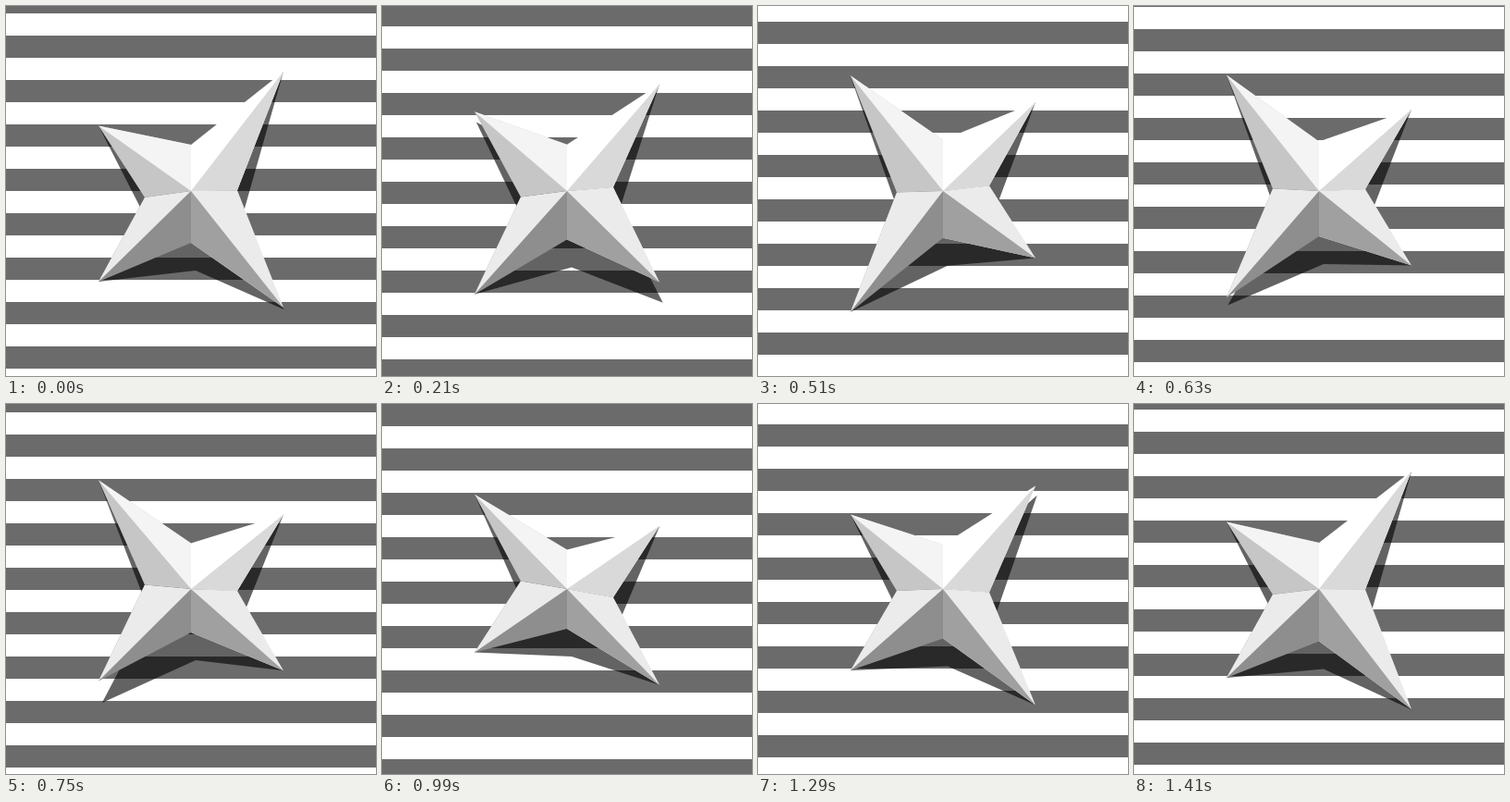
Write an HTML page that moves like this. It is 400 px wide and 400 px high and loops after 1.44 s.

```html
<!DOCTYPE html>
<html lang="en">
<head>
<meta charset="utf-8">
<title>Walking star</title>
<style>
html, body { margin: 0; width: 100%; height: 100%; overflow: hidden; background: #fff; }
svg { display: block; width: 100vw; height: 100vh; }
</style>
</head>
<body>
<svg id="stage" viewBox="0 0 400 400"></svg>
<script>
const LOOP = 1440, STEP = 30;
const TRAVEL = 96;   // ground distance per loop
const STRIDE = 64;   // reach of each foot
const SWING = 32;    // ground distance covered while a foot returns
const BODY = 30;     // body height above the ground

// Feet clockwise from top left: x, uppermost y, start of the return swing
const feet = [
  { x: 100, top: 69.5, lift: 4 },
  { x: 300, top: 70, lift: 63.2 },
  { x: 300, top: 268.3, lift: 92.8 },
  { x: 100, top: 267, lift: 33 }
];

// Facet colours before and after each ridge, clockwise
const shades = [
  ['#c6c6c6', '#f4f4f4'],
  ['#ffffff', '#d9d9d9'],
  ['#ebebeb', '#a0a0a0'],
  ['#8e8e8e', '#ebebeb']
];

const pace = [[0, 0], [990, 64.3], [1140, 76], [1410, 94], [LOOP, TRAVEL]];

const stage = document.getElementById('stage');

function add(name, attrs) {
  const el = document.createElementNS('http://www.w3.org/2000/svg', name);
  for (const key in attrs) el.setAttribute(key, attrs[key]);
  return stage.appendChild(el);
}

const stripes = Array.from({ length: 10 }, () =>
  add('rect', { width: 400, height: 24, fill: '#6b6b6b' }));
const shadow = add('polygon', { fill: '#000', 'fill-opacity': 0.61 });
const facets = shades.map(pair => pair.map(fill => add('polygon', { fill })));

const setPoints = (el, pts) =>
  el.setAttribute('points', pts.map(p => p.map(v => v.toFixed(2)).join()).join(' '));

function distance(t) {
  const i = pace.findIndex(p => p[0] > t);
  const [t0, d0] = pace[i - 1], [t1, d1] = pace[i];
  return d0 + (d1 - d0) * (t - t0) / (t1 - t0);
}

function pose(foot, d) {
  const p = (d - foot.lift + TRAVEL) % TRAVEL;
  if (p >= SWING) return { tip: [foot.x, foot.top + p - SWING], height: 0 };
  const k = p / SWING;
  const rise = 1 - Math.abs(2 * k - 1);
  return {
    tip: [foot.x, foot.top + STRIDE * (1 - k)],
    height: 24 * Math.pow(rise, 1.5)
  };
}

const drop = ([x, y], h) => [x + h / 6, y + h];

function draw(time) {
  const d = distance(Math.floor(time % LOOP / STEP) * STEP);
  const shift = Math.round(d) % 48;
  stripes.forEach((s, i) => s.setAttribute('y', shift - 64 + 48 * i));

  const legs = feet.map(f => pose(f, d));
  const tips = legs.map(l => l.tip);
  const centre = [200, 200];
  // Notch between a foot and the next one, halfway to the centre
  const notch = tips.map((a, i) => {
    const b = tips[(i + 1) % 4];
    return [100 + (a[0] + b[0]) / 4, 100 + (a[1] + b[1]) / 4];
  });

  setPoints(shadow, tips.flatMap((tip, i) =>
    [drop(tip, legs[i].height), drop(notch[i], BODY)]));

  facets.forEach(([before, after], i) => {
    const prev = notch[(i + 3) % 4];
    setPoints(before, [tips[i], notch[i], centre, prev]);
    setPoints(after, [tips[i], notch[i], centre]);
  });
}

const start = performance.now();
function tick() {
  draw(performance.now() - start);
  requestAnimationFrame(tick);
}
tick();
</script>
</body>
</html>
```
